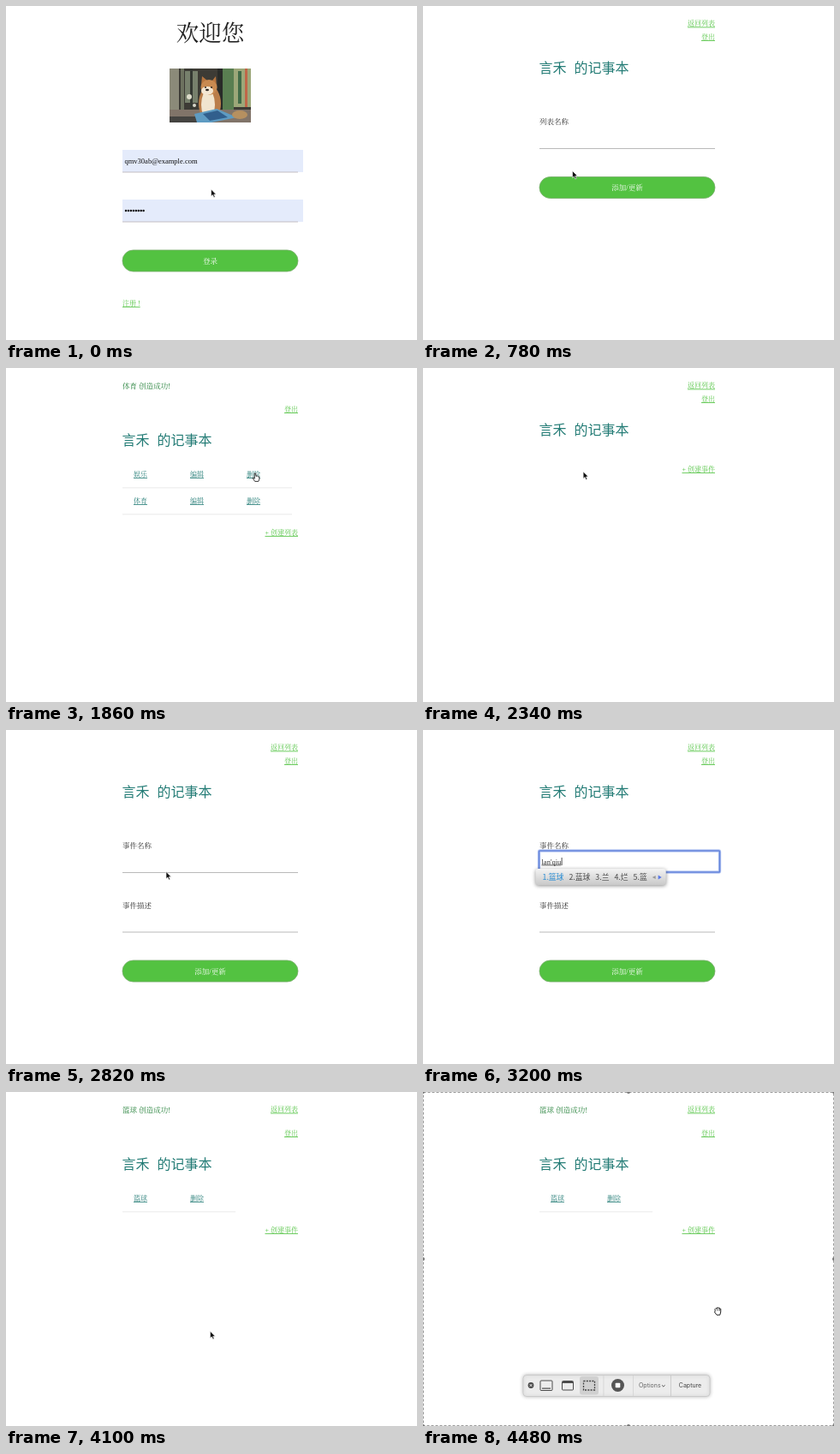
An HTML page with a canvas that plays this animation: 480 px wide and 390 px high, repeating every 4.5 s.

```html
<!DOCTYPE html>
<html lang="zh-CN">
<head>
<meta charset="utf-8">
<title>记事本</title>
<style>
html, body { margin: 0; width: 100%; height: 100%; overflow: hidden; background: #fff; }
canvas { display: block; }
</style>
</head>
<body>
<canvas id="stage" width="480" height="390"></canvas>
<script>
const ctx = document.getElementById('stage').getContext('2d');
const LOOP = 4500, STEP = 20;
const SERIF = '"Liberation Serif", "Noto Serif CJK SC", "Noto Sans CJK SC", serif';
const SANS = '"Noto Sans CJK SC", "Noto Sans CJK", sans-serif';
const INK = '#303030', GREEN = '#4ec23e', TEAL = '#247c76';
const OWNER = '言禾';

// Each entry holds from its time until the next one.
const PAGES = [
  [0, login],
  [240, () => listPage(['娱乐'])],
  [580, listForm],
  [1500, () => listPage(['娱乐', '体育'], '体育 创造成功!')],
  [1980, () => listPage(['体育'], '娱乐 删除成功!')],
  [2280, () => eventPage([])],
  [2560, eventForm],
  [4080, () => eventPage(['篮球'], '篮球 创造成功!')]
];

// time, committed text, composing text, candidates
const LIST_NAME = [
  [0, ''],
  [940, '', 't', '他 天 太 听 条'],
  [980, '', 'ti', '体 提 题 替 踢'],
  [1020, '', "ti'y", '体育 体验 提议 抬 题'],
  [1060, '', "ti'yu", '体育 提 体 题 替'],
  [1180, '体育']
];
const EVENT_NAME = [
  [0, ''],
  [2940, '', 'l', '了 来 里 两 老'],
  [2980, '', 'lan', '蓝 兰 烂 篮 懒'],
  [3040, '', "lan'q", '篮球 蓝 兰 烂 篮'],
  [3100, '', "lan'qiu", '篮球 蓝球 兰 烂 篮'],
  [3220, '篮球']
];
const EVENT_NOTE = [
  [0, ''],
  [3440, '', 'z', '在 这 中 只 再'],
  [3500, '', 'zh', '这 中 只 着 找'],
  [3560, '', 'zhou', '周 州 洲 粥 舟'],
  [3620, '', "zhou'r", '周日 昼日 骤然 粥热 皱日'],
  [3680, '', "zhou'ri", '周日 昼日 周 州 洲'],
  [3720, '周日'],
  [3780, '周日', 'da', '大 打 达 答 搭'],
  [3820, '周日', "da'lan", '大 打 达 答 搭'],
  [3860, '周日', "da'lan'qiu", '打篮球 大 打 达 答'],
  [3940, '周日打篮球']
];

// time, x, y of the tip, shape
const POINTER = [
  [0, 239.5, 214, 'arrow'],
  [60, 239, 230, 'arrow'],
  [160, 236, 296, 'hand'],
  [260, 237, 297, 'arrow'],
  [480, 322, 146, 'hand'],
  [600, 322, 146, 'arrow'],
  [780, 174.5, 192.5, 'arrow'],
  [860, 178, 153, 'arrow'],
  [920, 178, 153, ''],
  [1220, 178, 153, 'arrow'],
  [1380, 231, 200, 'arrow'],
  [1420, 237, 209, 'hand'],
  [1500, 237, 209, 'arrow'],
  [1660, 264, 188, 'arrow'],
  [1820, 291, 123, 'hand'],
  [1980, 291, 123, 'arrow'],
  [2160, 158, 122, 'hand'],
  [2290, 158, 122, 'arrow'],
  [2480, 328, 116, 'hand'],
  [2570, 328, 116, 'arrow'],
  [2720, 187, 165.5, 'arrow'],
  [2820, 187, 165.5, 'arrow'],
  [2880, 184, 154, 'arrow'],
  [2920, 184, 154, ''],
  [3260, 184, 154, 'arrow'],
  [3360, 190, 221, 'arrow'],
  [3420, 190, 221, ''],
  [3950, 190, 221, 'arrow'],
  [4030, 236, 280, 'hand'],
  [4090, 236, 280, 'arrow'],
  [4200, 341, 251, 'arrow'],
  [4500, 341, 251, 'arrow']
];

let now = 0;
const current = track => track.filter(k => k[0] <= now).pop();

function text(str, x, y, size = 8.5, color = INK, align = 'left', family = SERIF) {
  ctx.font = `${size}px ${family}`;
  ctx.textAlign = align;
  ctx.fillStyle = color;
  ctx.fillText(str, x, y + size * 0.37);
  return ctx.measureText(str).width;
}

function rect(x, y, w, h, color) {
  ctx.fillStyle = color;
  ctx.fillRect(x, y, w, h);
}

function rounded(x, y, w, h, r, fill, stroke, width = 1) {
  ctx.beginPath();
  ctx.roundRect(x, y, w, h, r);
  if (fill) { ctx.fillStyle = fill; ctx.fill(); }
  if (stroke) { ctx.strokeStyle = stroke; ctx.lineWidth = width; ctx.stroke(); }
}

function shape(points, fill, stroke, width = 1) {
  ctx.beginPath();
  points.forEach(([x, y]) => ctx.lineTo(x, y));
  ctx.closePath();
  if (fill) { ctx.fillStyle = fill; ctx.fill(); }
  if (stroke) { ctx.strokeStyle = stroke; ctx.lineWidth = width; ctx.stroke(); }
}

function oval(x, y, rx, ry, color, turn = 0) {
  ctx.beginPath();
  ctx.ellipse(x, y, rx, ry, turn, 0, Math.PI * 2);
  ctx.fillStyle = color;
  ctx.fill();
}

function link(str, x, y, color = GREEN, align = 'left') {
  const w = text(str, x, y, 8, color, align);
  rect(align === 'right' ? x - w : x, y + 4, w, 0.8, color);
}

function button(label, y) {
  rounded(136, y + 0.5, 205, 25, 12.5, '#53c241', '#78ad6b', 0.8);
  text(label, 238.5, y + 13, 8.5, '#fff', 'center');
}

function photo() {
  ctx.save();
  ctx.beginPath();
  ctx.rect(191, 73, 95, 63);
  ctx.clip();
  rect(191, 73, 95, 63, '#3d3b35');
  rect(191, 73, 11, 63, '#8b8a79');
  rect(204, 73, 4, 48, '#6d725f');
  rect(209, 76, 15, 37, '#77806c');
  rect(215, 73, 3, 52, '#343832');
  rect(247, 73, 6, 48, '#292b28');
  rect(253, 73, 13, 48, '#597e51');
  rect(266, 73, 20, 45, '#9ca779');
  rect(271, 76, 4, 38, '#416b48');
  rect(279, 73, 3, 45, '#c06648');
  rect(191, 121, 95, 15, '#817469');
  rect(191, 129, 40, 7, '#454441');
  oval(238, 114, 13, 21, '#ba7d49');
  oval(236, 115, 8, 17, '#f1e5cf');
  shape([[228, 92], [229, 82], [235, 87], [241, 87], [245, 82], [246, 96]], '#b7753f');
  oval(237, 95, 9.5, 9, '#c88a51');
  oval(235, 99, 7, 5, '#f4e7d3');
  oval(233, 95, 1, 1, '#29231f');
  oval(240, 95, 1, 1, '#29231f');
  oval(235, 98, 2, 1.3, '#29231f');
  shape([[220, 126], [246, 120], [270, 130], [240, 136], [223, 136]], '#5e9bc2');
  shape([[230, 126], [247, 122], [259, 130], [238, 134]], '#315f8d');
  oval(273, 127, 9, 5, '#b69060');
  oval(214, 106, 3, 3, '#dddcca');
  oval(220, 116, 2, 2, '#d6d5c8');
  ctx.restore();
}

function login() {
  text('欢迎您', 238.5, 31, 26.5, '#222', 'center');
  photo();
  for (const y of [168, 226]) {
    rect(136, y, 211, 26, '#e4ebfb');
    rect(136, y + 25.5, 205, 1, '#c4bdc4');
  }
  text('qmv30ab@example.com', 138.5, 181, 8.5, '#111');
  for (let i = 0; i < 8; i++) oval(140 + i * 2.95, 239, 1.25, 1.25, '#111');
  button('登录', 284.5);
  link('注册 !', 136, 347);
}

// Flash messages push the page down by 12 pixels.
function header(flash, back) {
  const shift = flash ? 12 : 0;
  if (flash) text(flash, 136, 21, 8.5, '#25813a');
  if (back) link('返回列表', 341, 20.5, GREEN, 'right');
  link('登出', 341, 36 + shift, GREEN, 'right');
  text(OWNER, 135.5, 72 + shift, 16, TEAL, 'left', SANS);
  text('的记事本', 176.5, 72 + shift, 16, TEAL, 'left', SANS);
  return shift;
}

function table(rows, actions, shift, create) {
  rows.forEach((name, i) => {
    const y = 112 + shift + i * 31;
    [name, ...actions].forEach((label, col) => link(label, 149 + col * 66, y, TEAL));
    rect(136, y + 15.5, 66 * (actions.length + 1), 0.8, '#e4e4e4');
  });
  link(create, 341, 118 + shift + rows.length * 31, GREEN, 'right');
}

function listPage(rows, flash) {
  table(rows, ['编辑', '删除'], header(flash), '+ 创建列表');
}

function eventPage(rows, flash) {
  table(rows, ['删除'], header(flash, true), '+ 创建事件');
}

function field(label, y, track, focused) {
  text(label, 136, y);
  const [, done, typing = '', words] = current(track);
  if (focused) {
    rounded(135.5, y + 6, 211, 25, 1, '#fff', '#b9c9f3', 3.4);
    rounded(135.5, y + 6, 211, 25, 1, null, '#6485dc', 1.7);
  } else {
    rect(136, y + 31, 205, 1, '#b9b9b9');
  }
  const start = 138.5 + text(done, 138.5, y + 18.5);
  const w = text(typing, start, y + 18.5);
  if (typing) rect(start, y + 22.5, w, 0.8, INK);
  if (focused) rect(start + w + 0.4, y + 14, 0.8, 9, '#222');
  return () => { if (words && focused) candidates(words.split(' '), start - 7, y + 27); };
}

function candidates(words, x, y) {
  const fade = ctx.createLinearGradient(0, y, 0, y + 19);
  fade.addColorStop(0, '#f3f3f3');
  fade.addColorStop(1, '#c9c9c9');
  ctx.font = `8.8px ${SANS}`;
  const labels = words.map((word, i) => `${i + 1}.${word}`);
  const widths = labels.map(label => ctx.measureText(label).width + 6);
  const total = widths.reduce((sum, w) => sum + w, 24);
  ctx.save();
  ctx.shadowColor = 'rgba(0,0,0,.45)';
  ctx.shadowBlur = 4;
  ctx.shadowOffsetY = 1;
  rounded(x, y, total, 19, 3, fade);
  ctx.restore();
  let left = x + 8;
  labels.forEach((label, i) => {
    text(label, left, y + 9.5, 8.8, i ? '#4c4c4c' : '#278bd3', 'left', SANS);
    left += widths[i];
  });
  const end = x + total - 6;
  shape([[end - 10, y + 10], [end - 6, y + 8], [end - 6, y + 12]], '#999');
  shape([[end - 3, y + 7.5], [end + 1, y + 10], [end - 3, y + 12.5]], '#5878e8');
}

function listForm() {
  header('', true);
  const popup = field('列表名称', 135, LIST_NAME, now >= 880);
  button('添加/更新', 199);
  popup();
}

function eventForm() {
  header('', true);
  const popups = [
    field('事件名称', 135, EVENT_NAME, now >= 2880 && now < 3380),
    field('事件描述', 204.5, EVENT_NOTE, now >= 3380)
  ];
  button('添加/更新', 268.5);
  popups.forEach(show => show());
}

function arrow() {
  shape([[0, 0], [0, 8.2], [1.9, 6.5], [3.3, 9.5], [4.7, 8.9], [3.4, 6], [5.9, 5.9]], '#111', '#fff', 0.6);
}

function hand() {
  shape([[-0.8, 0], [0.7, 0], [1, 3.4], [2.4, 3], [3.5, 3.7], [4.7, 4], [4.9, 6.8],
    [3.8, 9.4], [-0.3, 9.4], [-3, 5.6], [-2, 5], [-0.7, 6.2]], '#fff', '#222', 0.9);
}

function openHand() {
  shape([[0, 2.5], [0.9, 1.6], [2, 2], [2.6, 0.7], [4, 1.2], [5.2, 1], [5.7, 2.2], [6.8, 2.3],
    [6.7, 6], [5.8, 9.3], [2, 9.3], [-0.5, 6], [0.2, 5]], '#fff', '#222', 1);
  for (const x of [2.2, 3.8, 5.3]) rect(x, 2.2, 0.6, 2.3, '#222');
}

function pointer(capturing) {
  const i = POINTER.findLastIndex(k => k[0] <= now);
  const [t0, x0, y0, kind] = POINTER[i];
  const [t1, x1, y1] = POINTER[Math.min(i + 1, POINTER.length - 1)];
  if (!kind) return;
  const p = t1 > t0 ? (now - t0) / (t1 - t0) : 0;
  const ease = p * p * (3 - 2 * p);
  ctx.save();
  ctx.translate(x0 + (x1 - x0) * ease, y0 + (y1 - y0) * ease);
  if (capturing) openHand();
  else if (kind === 'hand') hand();
  else arrow();
  ctx.restore();
}

function captureBar() {
  ctx.setLineDash([3, 2]);
  ctx.lineWidth = 1;
  ctx.strokeStyle = '#9b9b9b';
  ctx.strokeRect(0.5, 0.5, 479, 389);
  ctx.setLineDash([]);
  for (const [x, y] of [[0, 0], [240, 0], [480, 0], [0, 195], [480, 195], [0, 390], [240, 390], [480, 390]]) {
    oval(x, y, 2, 2, '#777');
  }

  ctx.save();
  ctx.shadowColor = 'rgba(0,0,0,.25)';
  ctx.shadowBlur = 4;
  rounded(117, 330.5, 218, 25, 4, '#ececec', '#c6c6c6', 0.8);
  ctx.restore();
  rounded(183, 332, 22, 21.5, 3, '#d0d0d0');
  rect(210.5, 331, 0.8, 24, '#d2d2d2');
  rect(245, 331, 0.8, 24, '#d2d2d2');
  rect(289, 331, 0.8, 24, '#c6c6c6');

  oval(126, 342.5, 3.4, 3.4, '#4b4b4b');
  ctx.strokeStyle = '#fff';
  ctx.lineWidth = 0.9;
  ctx.beginPath();
  for (const d of [-1.4, 1.4]) {
    ctx.moveTo(126 - d, 341.1);
    ctx.lineTo(126 + d, 343.9);
  }
  ctx.stroke();

  rounded(137, 337, 14, 11.5, 1, null, '#4b4b4b');
  rect(139, 345.5, 10, 1.2, '#4b4b4b');
  rounded(162.5, 337.5, 13, 10.5, 1, null, '#4b4b4b');
  rect(163, 338, 12, 2, '#4b4b4b');
  ctx.setLineDash([2, 1.3]);
  rounded(187.5, 337.5, 13, 10.5, 0, null, '#444', 1.3);
  ctx.setLineDash([]);
  oval(227.5, 342.5, 7.5, 7.5, '#555');
  rounded(224.7, 339.7, 5.6, 5.6, 0.8, '#fff');

  const ui = 'Inter, sans-serif';
  text('Options', 252, 342.8, 7, '#666', 'left', ui);
  text('Capture', 312, 342.8, 7, '#444', 'center', ui);
  ctx.beginPath();
  ctx.moveTo(279, 342.3);
  ctx.lineTo(280.8, 344);
  ctx.lineTo(282.6, 342.3);
  ctx.strokeStyle = '#555';
  ctx.lineWidth = 1;
  ctx.stroke();
}

function draw() {
  now = Math.floor(performance.now() % LOOP / STEP) * STEP;
  rect(0, 0, 480, 390, '#fff');
  current(PAGES)[1]();
  const capturing = now >= 4380;
  if (capturing) captureBar();
  pointer(capturing);
  requestAnimationFrame(draw);
}
draw();
</script>
</body>
</html>
```
